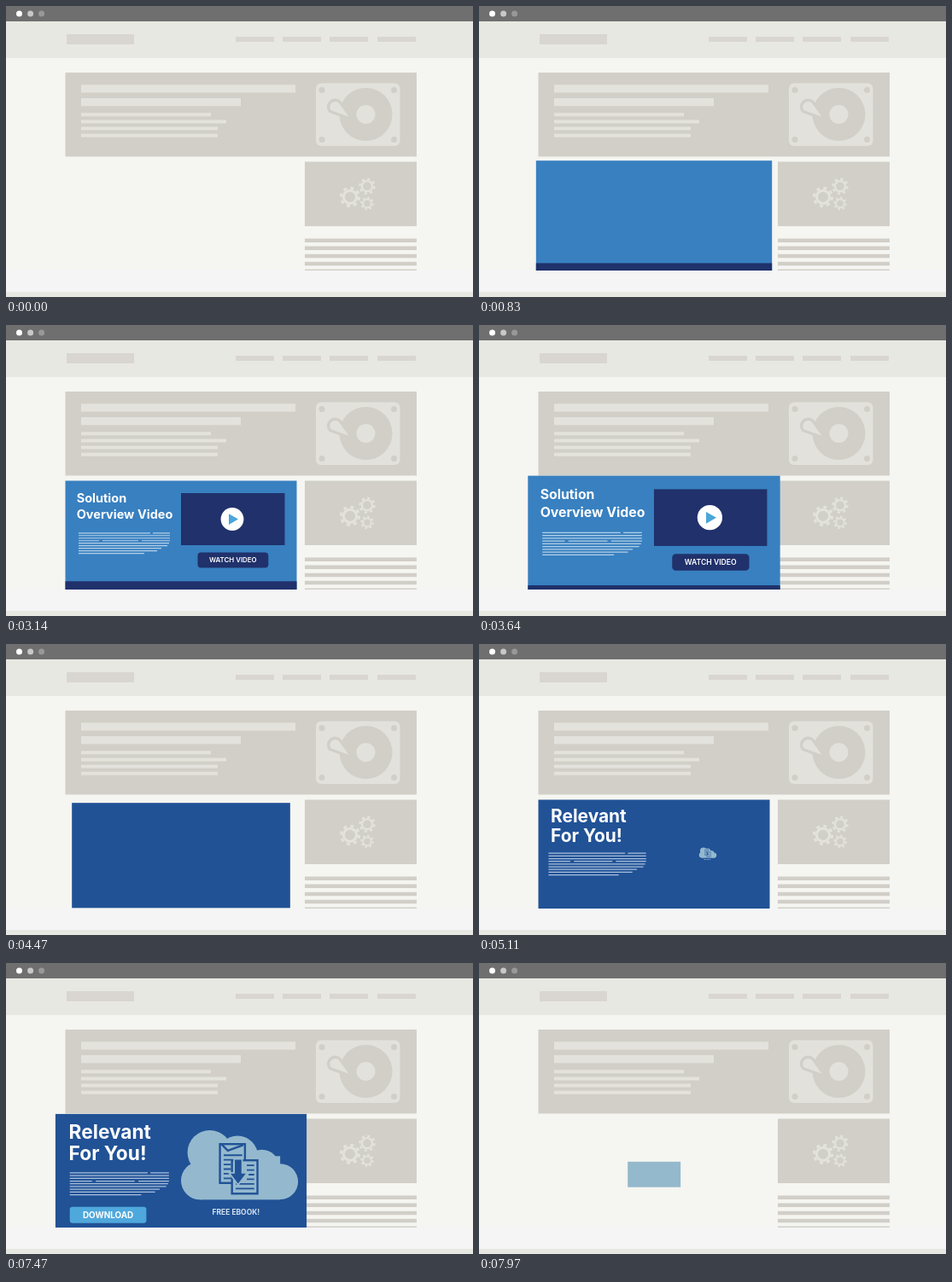
Animation, 547 px wide and 341 px high, one loop 8000 ms. Source, as an HTML page:

```html
<!DOCTYPE html>
<html lang="en">
<head>
<meta charset="utf-8">
<title>Banner rotation</title>
<style>
  html, body { margin: 0; width: 100%; height: 100%; overflow: hidden; background: #f5f5f1; }
  svg { display: block; width: 100vw; height: 100vh; }
  text { font-family: Inter, "Open Sans", sans-serif; font-weight: 700; fill: #fff; }
  .mid { text-anchor: middle; }
</style>
</head>
<body>
<svg viewBox="0 0 547 341">
  <defs><clipPath id="fold"><rect y="61" width="547" height="249"/></clipPath></defs>

  <rect width="547" height="341" fill="#f5f5f1"/>
  <rect y="18" width="547" height="43" fill="#e8e8e3"/>
  <rect width="547" height="18" fill="#6f6f6f"/>
  <circle cx="15.5" cy="9" r="3.5" fill="#fff"/>
  <circle cx="28.6" cy="9" r="3.5" fill="#c8c8c8"/>
  <circle cx="41.6" cy="9" r="3.5" fill="#989898"/>
  <path fill="#d9d6d2" d="M71 33h79v12H71zM269 36h45v6h-45zM324 36h45v6h-45zM379 36h45v6h-45zM435 36h45v6h-45z"/>
  <rect y="310" width="547" height="25" fill="#f5f5f6"/>
  <rect y="335" width="547" height="6" fill="#e8e8e3"/>

  <path fill="#d1cfc8" d="M69.5 78H481v98.5H69.5zM350 182.5h131V258H350z"/>
  <path fill="#d1cfc8" d="M350 272.5h131v4.5H350zM350 281.5h131v4.5H350zM350 290.7h131v4.6H350zM350 299.7h131v4.5H350zM350 308.5h131v1.5H350z"/>
  <path fill="#e3e2dc" d="M88 92.3h251v9.2H88zM88 108h187v9.2H88zM88 125.3h152v4H88zM88 133.5h170v4H88zM88 141.5h160v4H88zM88 149.8h160v4H88z"/>

  <rect x="363" y="90.5" width="98.5" height="73.5" rx="6" fill="#e2e1db"/>
  <g fill="#d1cfc8">
    <circle cx="370" cy="98.5" r="3.5"/><circle cx="454.5" cy="98.5" r="3.5"/>
    <circle cx="370" cy="156.5" r="3.5"/><circle cx="454.5" cy="156.5" r="3.5"/>
    <circle cx="421.5" cy="127" r="31"/>
  </g>
  <circle cx="421.5" cy="127" r="11" fill="#e2e1db"/>
  <path d="M406 133L379.5 123.5A7.7 7.7 0 1 1 391.5 113Z" fill="#e2e1db" stroke="#d1cfc8" stroke-width="3.4" stroke-linejoin="round"/>
  <g id="gears" fill="none" stroke="#e3e2dc"></g>

  <g clip-path="url(#fold)">
    <g id="video">
      <rect x="69.5" y="182.5" width="271" height="130.5" fill="#3880c0"/>
      <rect x="69.5" y="300.3" width="271" height="12.7" fill="#20316b"/>
      <g class="part" font-size="14.5">
        <text x="82.7" y="208">Solution</text>
        <text x="82.7" y="227">Overview Video</text>
      </g>
      <g class="part copy" data-y="243.8" stroke="#b4d0e8"></g>
      <g class="part">
        <rect x="205" y="197" width="121.5" height="61" fill="#20316b"/>
        <circle cx="265" cy="227.5" r="13.4" fill="#fff"/>
        <path d="M261 221.3L272 227.6L261 234Z" fill="#4aa6d9"/>
      </g>
      <g class="part">
        <rect x="224.5" y="266.5" width="82.8" height="18" rx="4" fill="#20316b"/>
        <text class="mid" x="265.8" y="278.4" font-size="7.9" style="font-weight:600">WATCH VIDEO</text>
      </g>
    </g>

    <g id="ebook">
      <rect x="69.5" y="182.5" width="271" height="130.5" fill="#215296"/>
      <g class="part" font-size="20.9">
        <text x="84" y="209.3">Relevant</text>
        <text x="84" y="232.3">For You!</text>
      </g>
      <g class="part copy" data-y="246" stroke="#a9bfdb"></g>
      <g class="part">
        <g fill="#94b9ce">
          <circle cx="236" cy="224" r="24"/><circle cx="266" cy="228" r="22"/>
          <circle cx="292" cy="240.5" r="19.5"/><circle cx="312" cy="255.5" r="19.3"/>
          <circle cx="225.5" cy="254.5" r="20.5"/>
          <rect x="225" y="228" width="87" height="47"/>
        </g>
        <g fill="#94b9ce" stroke="#215296" stroke-width="2.2">
          <rect x="247" y="215" width="27" height="42"/>
          <path d="M249 215.5L255.5 222L272 216" fill="none"/>
          <path d="M251 227h20M251 232h11M251 237h8M251 242h8M251 247h8M251 252h8" stroke-width="1.7"/>
          <rect x="260" y="232.5" width="27.5" height="36"/>
          <path d="M276 238h8M276 243h8M278 248h6M276 253h8M264 258h20M264 263h20" stroke-width="1.7"/>
        </g>
        <path d="M262.3 231H271V246H276.5L266.6 259L256.8 246H262.3Z" fill="#215296" stroke="#94b9ce" stroke-width="1.6"/>
        <text class="mid" x="264.3" y="291.3" font-size="7.8" style="fill:#d3e2ef">FREE EBOOK!</text>
      </g>
      <g class="part">
        <rect x="85" y="282.8" width="82.6" height="17.4" rx="3" fill="#4fa8dc"/>
        <text class="mid" x="126.3" y="294.6" font-size="9.1">DOWNLOAD</text>
      </g>
    </g>

    <g id="next">
      <rect x="69.5" y="182.5" width="271" height="130.5" fill="#94b9cc"/>
    </g>
  </g>
</svg>
<script>
const LOOP = 8000, PEAK = 1.092;
const NS = "http://www.w3.org/2000/svg";
const $ = id => document.getElementById(id);

function add(parent, tag, attrs) {
  const el = document.createElementNS(NS, tag);
  for (const k in attrs) el.setAttribute(k, attrs[k]);
  parent.appendChild(el);
}

// A gear is a ring plus a dashed ring for its teeth.
function gear(cx, cy, r, width, teeth) {
  const step = 2 * Math.PI * (r + width) / teeth;
  add($("gears"), "circle", { cx, cy, r, "stroke-width": width });
  add($("gears"), "circle", { cx, cy, r: r + width, "stroke-width": width,
    "stroke-dasharray": `${step * 0.48} ${step * 0.52}` });
}
gear(403, 223.8, 7.6, 3, 8);
gear(423, 211.2, 6.1, 2.4, 8);
gear(423, 231.4, 4.8, 2, 8);

const rows = ["M0 0h84m3 0h20", "M0 0h107", "M0 0h107", "M0 0h24m4 0h42m4 0h33", "M0 0h106",
  "M0 0h104", "M0 0h97", "M0 0h92", "M0 0h77"];
for (const g of document.querySelectorAll(".copy")) {
  rows.forEach((d, i) => add(g, "path", { d, "stroke-width": 1.15,
    transform: `translate(85 ${+g.dataset.y + i * 2.97})` }));
}

const ramp = (t, a, b) => {
  const u = Math.min(1, Math.max(0, (t - a) / (b - a)));
  return u * u * (3 - 2 * u);
};

// Grow past full size and settle.
const popIn = (t, start, rise, settle, peak) =>
  peak * ramp(t, start, start + rise) - (peak - 1) * ramp(t, start + rise, start + rise + settle);

// Swell, then collapse.
const popOut = (t, start) =>
  1 + (PEAK - 1) * ramp(t, start, start + 550) - PEAK * ramp(t, start + 550, start + 745);

function zoom(el, s, cx, cy) {
  el.style.display = s > 0.004 ? "" : "none";
  el.setAttribute("transform", `translate(${cx} ${cy}) scale(${s}) translate(${-cx} ${-cy})`);
}

const centres = {
  video: [[138, 213], [138, 256], [265.7, 227.5], [266, 275.5]],
  ebook: [[129, 214], [138, 258], [268, 246], [126.3, 291.5]],
};
const delays = [850, 1010, 1170, 1450];

const banners = [
  { id: "video", start: -20, end: 3140 },
  { id: "ebook", start: 3887, end: 7010 },
  { id: "next", start: 7747, end: Infinity },
].map(b => ({ ...b, el: $(b.id), parts: [...$(b.id).querySelectorAll(".part")] }));

function draw(t) {
  for (const b of banners) {
    const s = t < b.end ? popIn(t, b.start, 760, 130, PEAK) : popOut(t, b.end);
    zoom(b.el, s, 205.2, 247.75);
    b.parts.forEach((p, i) =>
      zoom(p, popIn(t, b.start + delays[i], 220, 120, 1.07), ...centres[b.id][i]));
  }
}

const origin = performance.now();
function tick() {
  draw((performance.now() - origin) % LOOP);
  requestAnimationFrame(tick);
}
draw(0);
requestAnimationFrame(tick);
</script>
</body>
</html>
```
